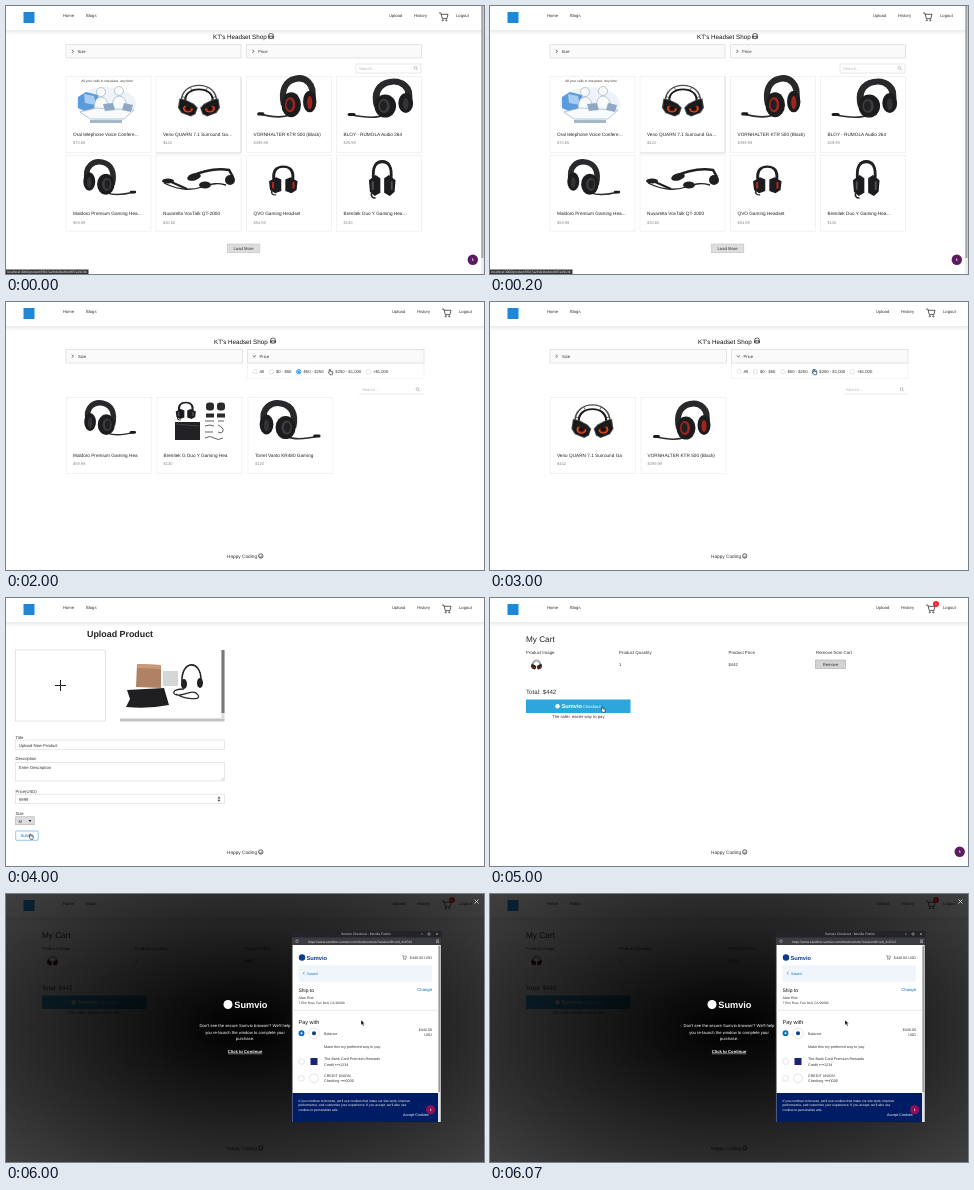
An HTML page that plays this animation: 478x268 px, repeating every 6990 ms.

```html
<!DOCTYPE html>
<html lang="en">
<head>
<meta charset="utf-8">
<title>Headset shop walkthrough</title>
<style>
html, body { margin: 0; width: 100%; height: 100%; overflow: hidden; background: #fff; }
svg { display: block; }
#stage { width: 100vw; height: 100vh; }
text { font: 4.2px "Liberation Sans", Arial, sans-serif; fill: #333; text-rendering: geometricPrecision; white-space: pre; }
.mid { text-anchor: middle; }
.end { text-anchor: end; }
.bold { font-weight: bold; }
.name { font-size: 4.7px; fill: #222; }
.soft { font-size: 4px; fill: #888; }
.hint { fill: #bbb; }
.label { font-size: 4.4px; }
.small { font-size: 3.7px; }
.tiny { font-size: 3.3px; }
.head { font-size: 8.2px; fill: #222; }
.shop { font-size: 6.25px; fill: #111; }
.link { fill: #0070ba; }
.white { fill: #fff; }
.line { fill: none; stroke: #d9d9d9; stroke-width: .7; }
.box { fill: #fafafa; stroke: #d9d9d9; stroke-width: .7; }
.field { fill: #fff; stroke: #d9d9d9; stroke-width: .6; }
.ink { fill: none; stroke: #222; stroke-width: .7; }

/* One second per scene; the opening scene is topmost, so it cuts the last one short. */
.scene { opacity: 0; animation: show 6990ms step-end calc(var(--at) * 1000ms - 6990ms) infinite; }
@keyframes show {
  0% { opacity: 1; }
  14.306%, 100% { opacity: 0; }
}
</style>
</head>
<body>
<svg id="stage" viewBox="0 0 478 268" preserveAspectRatio="none">
<defs>
  <linearGradient id="shade" x2="0" y2="1">
    <stop stop-color="#ebebeb"/><stop offset="1" stop-color="#fff"/>
  </linearGradient>
  <radialGradient id="dim" r=".707">
    <stop offset=".01"/><stop offset="1" stop-opacity=".75"/>
  </radialGradient>

  <g id="basket" fill="none" stroke="#333" stroke-width=".8">
    <path d="M0 1h1.8l1.5 5.6h4.6L9 2.3H2.2"/>
    <circle cx="3.8" cy="8.3" r=".6"/><circle cx="7.3" cy="8.3" r=".6"/>
  </g>
  <g id="menu">
    <text x="383" y="11">Upload</text>
    <text x="408" y="11">History</text>
    <use href="#basket" x="433" y="6"/>
    <text x="450" y="11">Logout</text>
  </g>
  <g id="page">
    <rect width="478" height="268" fill="#fff"/>
    <rect y="24" width="478" height="5" fill="url(#shade)"/>
    <rect x="17.5" y="6" width="11" height="11" fill="#1e88d8"/>
    <text x="57" y="11">Home</text>
    <text x="80" y="11">Blogs</text>
  </g>
  <g id="badge">
    <circle cx="443" cy="6" r="3" fill="#f5222d"/>
    <text class="mid white tiny" x="443" y="7.2">1</text>
  </g>
  <g id="scroll">
    <rect x="475" width="3" height="268" fill="#ececec"/>
    <rect x="475.3" width="2.2" height="252" fill="#a6a6a6"/>
  </g>
  <g id="avatar">
    <circle r="5.2" fill="#5c1a60"/>
    <text class="mid white" y="1.5">k</text>
  </g>
  <g id="footer">
    <text x="221" y="256" style="font-size:4.75px">Happy Coding</text>
    <circle class="ink" cx="254.8" cy="254" r="2.2"/>
    <path class="ink" d="M253.6 254.6q1.2 1.2 2.4 0M254 253.2h.2M255.5 253.2h.2"/>
  </g>
  <g id="shopIcon" class="ink">
    <path d="M-2.3 1V-1q0-1.6 1.6-1.6H.7q1.6 0 1.6 1.6V1M-2.3 0h4.6M-2.5 .2v2h1.2v-2M1.3 .2v2h1.2v-2M-1 2.4H1"/>
  </g>
  <g id="lens" class="ink" style="stroke:#aaa"><circle r="1.4"/><path d="M1 1l1.5 1.5"/></g>
  <path id="hand" d="M1 0v3.4L0 3.6l1.8 3h3L5.6 3 2.4 2.3V0z" fill="#fff" stroke="#111" stroke-width=".7"/>
  <rect id="card" width="85" height="76" fill="#fff" stroke="#efefef" stroke-width=".8"/>
  <circle id="radio" r="2.2" fill="#fff" stroke="#d4d4d4" stroke-width=".6"/>
  <g id="picked"><circle r="2.2" fill="#fff" stroke="#1890ff" stroke-width=".8"/><circle r="1.3" fill="#1890ff"/></g>

  <!-- headsets -->
  <g id="cup">
    <path d="M5 44L20 47 42 60 52 73 46 93 34 100 10 89 1 73z" fill="#47484c"/>
    <path d="M7 47L20 50 41 63 49 74 44 91 33 97 12 87 4 73z" fill="#17181a"/>
    <ellipse cx="27" cy="75" rx="13" ry="12.5" fill="#d84a20"/>
    <circle cx="27" cy="75" r="9" fill="#7a2410"/>
    <circle cx="27" cy="75" r="6" fill="#1d0c08"/>
    <path d="M8 61L43 77 44 68 15 53z" fill="#1b1c1e"/>
  </g>
  <g id="owl" fill="none">
    <path d="M10 52C10 22 29 2.5 55 2.5s45 19.500 45 49.500" stroke="#4c4d51" stroke-width="4"/>
    <path d="M20 50C19 30 33 15 55 15s36 15 35 35" stroke="#1a1b1d" stroke-width="5.500"/>
    <path d="M33 9l3 8M77 9l-3 8M12 38l10 4M98 38l-10 4" stroke="#333" stroke-width="2"/>
    <use href="#cup"/>
    <use href="#cup" transform="matrix(-1 0 0 1 110 0)"/>
  </g>
  <g id="side">
    <path d="M7 24C3 8 14 2 23 4 33 6 37 15 34 28" fill="none" stroke="#29292b" stroke-width="6"/>
    <path d="M28 37C36 41 48 39 58 36.500" fill="none" stroke="#2c2c2e" stroke-width="1.600"/>
    <ellipse cx="9" cy="25" rx="6.500" ry="10" fill="#1c1c1e"/>
    <ellipse cx="9" cy="26" rx="2.500" ry="6" fill="var(--tone, #333336)"/>
    <ellipse cx="27" cy="28" rx="9.500" ry="11.500" fill="#1c1c1e"/>
    <ellipse cx="28" cy="28" rx="5" ry="7" fill="var(--tone, #3c3c3f)"/>
    <ellipse cx="28.500" cy="28" rx="3" ry="5" fill="#202022"/>
    <rect x="53" y="35" width="7" height="3" rx="1.500" fill="#1c1c1e"/>
  </g>
  <g id="front">
    <path d="M6 20C4 6 9 2 15 2s11 4 9 18" fill="none" stroke="#202022" stroke-width="3"/>
    <path d="M1 20l7-5 5 3v14l-6 3-5-4zM29 20l-7-5-5 3v14l6 3 5-4z" fill="#1c1c1e"/>
    <path d="M5 21v8M25 21v8" stroke="var(--tone, #505055)" stroke-width="2"/>
    <path d="M4 31q-2 6 4 6" fill="none" stroke="#2a2a2c" stroke-width="1.600"/>
  </g>

  <g id="filterPage">
    <use href="#page"/><use href="#menu" x="3"/><use href="#footer"/>
    <text class="shop" x="208" y="41.5">KT's Headset Shop</text>
    <use href="#shopIcon" x="267" y="38.8"/>
    <rect class="box" x="60" y="47.5" width="176.5" height="13.5"/>
    <rect class="field" x="241.5" y="61" width="176.5" height="15.5" style="stroke:#eee"/>
    <rect class="box" x="241.5" y="47.5" width="176.5" height="13.5"/>
    <path class="ink" d="M66 52.7l1.4 1.5-1.4 1.5M246.8 53.5l1.5 1.4 1.5-1.4"/>
    <text x="72" y="56">Size</text>
    <text x="253.5" y="56">Price</text>
    <use href="#radio" x="249" y="69.7"/>
    <use href="#radio" x="265.5" y="69.7"/>
    <use href="#radio" x="292.7" y="69.7"/>
    <use href="#radio" x="324.5" y="69.7"/>
    <use href="#radio" x="362.3" y="69.7"/>
    <text x="253.5" y="71.2">All</text>
    <text x="270" y="71.2">$0 - $50</text>
    <text x="297.5" y="71.2">$50 - $250</text>
    <text x="329.3" y="71.2">$250 - $1,000</text>
    <text x="367" y="71.2">+$1,000</text>
    <path class="line" d="M353 92H418" style="stroke:#e6e6e6"/>
    <text class="hint" x="356" y="89">Search...</text>
    <use href="#lens" x="411.5" y="87"/>
  </g>

  <g id="cartPage">
    <use href="#page"/><use href="#menu" x="3"/><use href="#badge" x="3"/><use href="#footer"/>
    <text class="head" x="36" y="44">My Cart</text>
    <text class="label" x="36" y="56.3">Product Image</text>
    <text class="label" x="129" y="56.3">Product Quantity</text>
    <text class="label" x="238.5" y="56.3">Product Price</text>
    <text class="label" x="326" y="56.3">Remove from Cart</text>
    <use href="#owl" transform="translate(41 61.5) scale(.1)"/>
    <text x="129" y="68">1</text>
    <text x="238.5" y="68">$442</text>
    <rect x="325.5" y="62" width="30" height="8.5" fill="#d3d3d3" stroke="#aaa" stroke-width=".6"/>
    <text class="mid" x="340.5" y="67.8">Remove</text>
    <text x="36" y="95.7" style="font-size:6.2px">Total: $442</text>
    <rect x="36" y="101.5" width="104.5" height="13.5" fill="#2da6dc"/>
    <circle cx="67.5" cy="108.3" r="2.2" fill="#fff"/>
    <text class="bold white" x="71.5" y="110.3" style="font-size:5.7px">Sumvio</text>
    <text class="white" x="93" y="110">Checkout</text>
    <text class="mid" x="88.3" y="120.2">The safer, easier way to pay</text>
  </g>
</defs>

<!-- product page -->
<g class="scene" style="--at:1">
  <use href="#page"/><use href="#menu"/><use href="#badge"/>
  <text class="head mid" x="237.5" y="44">Veno QUARN 7.1 Surround Gaming Headset</text>
  <use href="#owl" x="72" y="89"/>
  <g fill="none" stroke="#868686" stroke-width="2.6">
    <path id="arrows" d="M36.500 129.500L26 139.500l10.500 10M218 129.500l10.500 10-10.500 10"/>
    <use href="#arrows" stroke="#fff" stroke-width="1.2"/>
    <g id="controls" stroke="#999" stroke-width="1.800">
      <path d="M27.300 204.800v8.400l6.200-4.200z"/>
      <path d="M219.500 207.500v-3h3M225.500 204.500h3v3M228.500 210.500v3h-3M222.500 213.500h-3v-3"/>
    </g>
    <path d="M27.300 204.800v8.400l6.200-4.200zM219.500 207.500v-3h3M225.500 204.500h3v3M228.500 210.500v3h-3M222.500 213.500h-3v-3" stroke="#fff" stroke-width=".6"/>
  </g>
  <rect x="82" y="222.2" width="28.800" height="21.200" fill="#fff" stroke="#337ab7" stroke-width="1.5"/>
  <use href="#owl" transform="translate(89.500 225.500) scale(.14)"/>
  <use href="#side" transform="matrix(-.48 0 0 .52 142 222)" style="--tone:#b3261e"/>
  <path d="M147 233l3-7 6-4 7 2 5 5-1 10-6 4-11-1z" fill="#29292c"/>
  <path d="M150 232l6-5 9 3M150 238l5-5 10 4" fill="none" stroke="#66666a"/>
  <text class="bold label" x="240" y="63">Product Info</text>
  <text x="240" y="75.7">Price : 442</text>
  <text x="312" y="75.7">Size : 0</text>
  <text x="384" y="75.7">Views : 6</text>
  <text x="240" y="87.2">Description :</text>
  <text x="265" y="87.2">The Veno QUARN 7.1 Surround Gaming headset includes the real plug-and-play USB game station.</text>
  <use href="#hand" transform="translate(365 84) scale(.75)"/>
  <rect x="329.5" y="106" width="37" height="12" rx="6" fill="#f8706c"/>
  <text class="mid white" x="348" y="113.5">Add to Cart</text>
  <use href="#footer" y="15.5"/>
  <use href="#scroll"/>
  <use href="#avatar" x="466.8" y="253.7"/>
</g>

<!-- price filter: middle range -->
<g class="scene" style="--at:2">
  <use href="#filterPage"/>
  <use href="#picked" x="292.7" y="69.7"/>
  <use href="#hand" transform="translate(322.5 67.5) scale(.8)"/>
  <use href="#card" x="60.3" y="95.5"/>
  <use href="#card" x="151" y="95.5"/>
  <use href="#card" x="242" y="95.5"/>
  <use href="#side" transform="translate(76 97.500) scale(.9)"/>
  <use href="#front" transform="translate(169 99.500) scale(.72 .5)"/>
  <rect x="169" y="120" width="25" height="18" fill="#222225"/>
  <path d="M170 122l23 2" stroke="#4a4a4e" stroke-width=".8"/>
  <g fill="#2a2a2d">
    <rect x="200" y="100.500" width="8" height="8" rx="3"/><rect x="211" y="100.500" width="8" height="8" rx="3"/>
    <rect x="200" y="111.500" width="8" height="4"/><rect x="211" y="111.500" width="8" height="4"/>
  </g>
  <path class="ink" d="M199 119h9M212 119h6M199 124q5-2 9 0M212 123q6 3 5 6t-5 1M199 130h8M199 136q5-3 9 0t9 0"/>
  <use href="#side" transform="translate(251 97.500) scale(1.06 1)"/>
  <text class="name" x="67" y="155">Maldoro Premium Gaming Hea</text>
  <text class="name" x="157.5" y="155">Brenitek G Duo Y Gaming Hea</text>
  <text class="name" x="249" y="155">Torrel Vanto KR480 Gaming</text>
  <text class="soft" x="67" y="163.3">$59.99</text>
  <text class="soft" x="157.5" y="163.3">$130</text>
  <text class="soft" x="249" y="163.3">$120</text>
</g>

<!-- price filter: next range -->
<g class="scene" style="--at:3">
  <use href="#filterPage"/>
  <use href="#picked" x="324.5" y="69.7"/>
  <use href="#hand" transform="translate(322.5 67.5) scale(.8)"/>
  <use href="#card" x="60.3" y="95.5"/>
  <use href="#card" x="151" y="95.5"/>
  <use href="#owl" transform="translate(81 102) scale(.39 .34)"/>
  <use href="#side" transform="matrix(-1 0 0 1 223 98)" style="--tone:#a3241d"/>
  <text class="name" x="67" y="155">Veno QUARN 7.1 Surround Ga</text>
  <text class="name" x="157.5" y="155">VORNHALTER KTR 500 (Black)</text>
  <text class="soft" x="67" y="163.3">$442</text>
  <text class="soft" x="157.5" y="163.3">$399.99</text>
</g>

<!-- upload form -->
<g class="scene" style="--at:4">
  <use href="#page"/><use href="#menu" x="3"/><use href="#footer"/>
  <text class="bold" x="81" y="39" style="font-size:8.9px;fill:#222">Upload Product</text>
  <rect class="line" x="9.5" y="52" width="90" height="71"/>
  <path class="ink" d="M49 87.5h11M54.5 82v11" style="stroke-width:1"/>
  <path d="M131 66l24 1v23l-25-1z" fill="#b08263"/>
  <path d="M131 66l24 1v4l-24-1z" fill="#c79a7a"/>
  <rect x="157" y="73" width="15" height="15" fill="#d5d6d8"/>
  <path d="M121 92l37-2 5 17q-20 4-43 2l4-8z" fill="#1f1f22"/>
  <path d="M176 84c-1-22 19-23 19-2" fill="none" stroke="#222" stroke-width="1.6"/>
  <ellipse cx="178" cy="86" rx="3" ry="5" fill="#222"/>
  <ellipse cx="194" cy="85" rx="3" ry="5" fill="#222"/>
  <path d="M178 91c-14 0-12 7-4 6s14-6 18 0-14 4-22-1" fill="none" stroke="#2a2a2a" stroke-width="1.3"/>
  <rect x="114" y="120.5" width="104.5" height="3" fill="#c2c2c2"/>
  <rect x="215.5" y="52" width="3" height="69" fill="#ddd"/>
  <rect x="215.5" y="52" width="3" height="63" fill="#777"/>
  <text x="9.5" y="140.5">Title</text>
  <rect class="field" x="9.5" y="142" width="209" height="9.5"/>
  <text x="13" y="148.5">Upload New Product</text>
  <text x="9.5" y="162.3">Description</text>
  <rect class="field" x="9.5" y="164.5" width="209" height="18.5"/>
  <text x="13" y="170.5">Enter Description</text>
  <path class="ink" d="M215 182.3l2.8-2.8M216.7 182.3l1-1" style="stroke:#888;stroke-width:.4"/>
  <text x="9.5" y="194.6">Price(USD)</text>
  <rect class="field" x="9.5" y="196.2" width="209" height="9.5"/>
  <text x="13" y="202.8">9999</text>
  <path d="M211.5 200.4l1.5-2 1.5 2zM211.5 201.8l1.5 2 1.5-2z" fill="#444"/>
  <text x="9.5" y="217">Size</text>
  <rect x="9.7" y="218.8" width="18.5" height="8" fill="#ddd" stroke="#aaa" stroke-width=".6"/>
  <text x="12.5" y="224.5">M</text>
  <path d="M22.5 222l1.5 2 1.5-2z" fill="#222"/>
  <rect x="9.7" y="233" width="22.5" height="9.3" rx=".8" fill="#fff" stroke="#69b1ee" stroke-width=".7"/>
  <text class="mid link" x="21" y="239.2">Submit</text>
  <use href="#hand" transform="translate(23 236) scale(.8)"/>
</g>

<!-- cart -->
<g class="scene" style="--at:5">
  <use href="#cartPage"/>
  <use href="#hand" transform="translate(111 109) scale(.8)"/>
  <use href="#avatar" x="469.7" y="253.7"/>
</g>

<!-- payment window over the cart -->
<g class="scene" style="--at:6">
  <use href="#cartPage"/>
  <rect width="478" height="268" fill="url(#dim)"/>
  <path d="M468.5 5.5l4 4M472.5 5.5l-4 4" stroke="#ddd" stroke-width=".8"/>
  <circle cx="222" cy="110.5" r="4.5" fill="#fff"/>
  <text class="bold white" x="228.3" y="114" style="font-size:9.2px">Sumvio</text>
  <g class="mid">
    <text class="white" x="239" y="133">Don't see the secure Sumvio browser? We'll help</text>
    <text class="white" x="239" y="139.7">you re-launch the window to complete your</text>
    <text class="white" x="239" y="146.3">purchase.</text>
    <text class="white bold" x="239" y="158.7" text-decoration="underline">Click to Continue</text>
  </g>

  <rect x="285.5" y="37" width="150" height="191.5" fill="#242428"/>
  <text class="mid tiny" x="360" y="41.4" style="fill:#ccc">Sumvio Checkout - Mozilla Firefox</text>
  <path d="M415 40h2M422 39h2v2h-2zM430 39l2 2M432 39l-2 2" stroke="#bbb" stroke-width=".5" fill="none"/>
  <rect x="286" y="43.5" width="149" height="7.5" fill="#3b3b42"/>
  <circle cx="291" cy="47.2" r="1.3" fill="none" stroke="#ccc" stroke-width=".5"/>
  <text class="tiny" x="302" y="48.5" style="fill:#ddd">https://www.sandbox.sumvio.com/checkoutnow?sessionID=uid_4c07e2</text>
  <rect x="426" y="44" width="8" height="6.5" fill="#3b3b42"/>
  <path d="M430 46h3M430 47.3h3M430 48.6h3" stroke="#ddd" stroke-width=".5"/>

  <rect x="286.5" y="51" width="148" height="177" fill="#fff"/>
  <circle cx="296" cy="63.5" r="3.2" fill="#0a3d91"/>
  <text class="bold" x="300.5" y="65.6" style="font-size:5.7px;fill:#0a3d91">Sumvio</text>
  <use href="#basket" transform="translate(396 61) scale(.5)"/>
  <text class="small end" x="426" y="65">$440.00 USD</text>
  <rect x="292.5" y="71.3" width="133.5" height="16.5" fill="#f0f5fc"/>
  <path d="M298.5 78l-1.3 1.3 1.3 1.3" fill="none" stroke="#0070ba" stroke-width=".6"/>
  <text class="small link" x="301" y="80.5">Saved</text>
  <text x="292.5" y="97.5" style="font-size:5px;fill:#111">Ship to</text>
  <text class="link end" x="426" y="97">Change</text>
  <text class="small" x="292.5" y="104.5">Alan Roe</text>
  <text class="tiny" x="292.5" y="110">7 Elm Row, Fair Dell, CA 90000</text>
  <path d="M286.5 116.3H432" stroke="#ddd" stroke-width=".7"/>
  <text x="292.5" y="130" style="font-size:5.5px;fill:#111">Pay with</text>
  <path d="M355 126v5l1.2-1 1 2 .9-.5-1-2h1.6z" fill="#111" stroke="#fff" stroke-width=".3"/>
  <circle cx="295.5" cy="139.2" r="2.9" fill="#0070ba"/>
  <circle cx="295.5" cy="139.2" r="1" fill="#fff"/>
  <circle cx="308" cy="139.2" r="5.3" fill="#fff" stroke="#ddd" stroke-width=".7"/>
  <circle cx="308" cy="139.2" r="2" fill="#0a3d91"/>
  <text class="small" x="318" y="140.7">Balance</text>
  <text class="small end" x="426" y="137.3">$440.00</text>
  <text class="small end" x="426" y="142.3">USD</text>
  <text class="small" x="318" y="153.8">Make this my preferred way to pay</text>
  <circle class="line" cx="295.5" cy="167.5" r="2.9"/>
  <rect x="304.5" y="164" width="7" height="7" fill="#1a2472"/>
  <text class="small" x="318" y="166.2">The Bank Card Premium Rewards</text>
  <text class="small" x="318" y="171.7">Credit ••••1234</text>
  <circle class="line" cx="295.5" cy="184.3" r="2.9"/>
  <circle class="line" cx="308" cy="184.3" r="4.5"/>
  <text class="small" x="318" y="182.6">CREDIT UNION</text>
  <text class="small" x="318" y="188.2">Checking ••••0000</text>

  <rect x="286.5" y="199" width="145.5" height="29" fill="#001c64"/>
  <text class="white tiny" x="292.5" y="207.7">If you continue to browse, we'll use cookies that make our site work, improve</text>
  <text class="white tiny" x="292.5" y="212.2">performance, and customize your experience. If you accept, we'll also use</text>
  <text class="white tiny" x="292.5" y="216.7">cookies to personalize ads.</text>
  <text class="white small" x="397" y="222.3">Accept Cookies</text>
  <rect x="432" y="51" width="2.5" height="177" fill="#e4e4e4"/>
  <rect x="432.5" y="52" width="1.5" height="146" fill="#9a9a9a"/>
  <circle cx="424.7" cy="215.7" r="4.7" fill="#8c1058"/>
  <text class="mid white small" x="424.7" y="217">k</text>
</g>

<!-- shop front -->
<g class="scene" style="--at:0">
  <use href="#page"/><use href="#menu"/>
  <text class="shop" x="207" y="32.7">KT's Headset Shop</text>
  <use href="#shopIcon" x="265" y="30.2"/>
  <rect class="box" x="60" y="38.7" width="175" height="13.3"/>
  <rect class="box" x="240.5" y="38.7" width="175" height="13.3"/>
  <path class="ink" d="M66 43.8l1.4 1.5-1.4 1.5M246.5 43.8l1.4 1.5-1.4 1.5"/>
  <text x="71.5" y="47">Size</text>
  <text x="252" y="47">Price</text>
  <rect class="field" x="350" y="58" width="65" height="9"/>
  <text class="hint" x="353" y="64">Search...</text>
  <use href="#lens" x="409.5" y="61.7"/>

  <g id="row">
    <use href="#card" x="60" y="70.5"/>
    <use href="#card" x="150" y="70.5"/>
    <use href="#card" x="240.5" y="70.5"/>
    <use href="#card" x="330.5" y="70.5"/>
  </g>
  <use href="#row" y="78.7"/>
  <path d="M150 147h85V71" fill="none" stroke="#dedede"/>

  <!-- call centre picture -->
  <ellipse cx="100" cy="98" rx="30" ry="17" fill="#edf3f9"/>
  <text class="tiny mid" x="101" y="75.500">All your calls in one place, any time</text>
  <path d="M72 91l8-5 12 3 3 12-12 6-11-5z" fill="#5b9bdd"/>
  <path d="M78 88l10 2 2 9-11-2z" fill="#a9cdf0"/>
  <g fill="#f8fafc" stroke="#a3b2c1" stroke-width=".7">
    <circle cx="95" cy="86" r="4.500"/><circle cx="113" cy="85" r="4.500"/>
    <path d="M88 104q0-13 7-13t8 13zM106 104q0-14 7-14t9 14z"/>
    <path d="M74 106l16-4 38 2-10 9H84z"/>
  </g>
  <path d="M97 98l10-1 2 7-10 1zM118 97l9 2-2 7-9-2z" fill="#8fa9c4"/>
  <path d="M84 114h32v3H84z" fill="#a4b8cc"/>

  <use href="#owl" transform="translate(171.5 78.5) scale(.39 .32)"/>
  <use href="#side" transform="matrix(-1.03 0 0 1.08 313 68.500)" style="--tone:#a3241d"/>
  <use href="#side" transform="matrix(-1.140 0 0 1 410 72)"/>
  <use href="#side" transform="translate(75 152.500) scale(.92)"/>
  <g fill="none" stroke="#202022">
    <path d="M158 177c12 6 26 8 38 4s16-4 24-2" stroke-width="1.3"/>
    <path d="M183 171q22-10 40-7l4 7" stroke-width="2.500"/>
    <path d="M163 175l18 8" stroke-width="2.200"/>
  </g>
  <g fill="#202022">
    <ellipse cx="188" cy="171" rx="7" ry="3.500" transform="rotate(-15 188 171)"/>
    <ellipse cx="199" cy="179" rx="6" ry="3.500"/>
    <ellipse cx="224" cy="174" rx="5" ry="5"/>
    <ellipse cx="162" cy="175" rx="6" ry="2.500"/>
  </g>
  <use href="#front" transform="translate(262 159) scale(1.02 .81)" style="--tone:#b3261e"/>
  <use href="#front" transform="translate(362 153.5) scale(.95 1.04)"/>

  <text class="name" x="67" y="129.7">Oral telephone Voice Confere…</text>
  <text class="name" x="157" y="129.7">Veno QUARN 7.1 Surround Ga…</text>
  <text class="name" x="247.5" y="129.7">VORNHALTER KTR 500 (Black)</text>
  <text class="name" x="337.5" y="129.7">BLOY - RUMOLA Audio 264</text>
  <text class="soft" x="67" y="138">$70.65</text>
  <text class="soft" x="157" y="138">$442</text>
  <text class="soft" x="247.5" y="138">$399.99</text>
  <text class="soft" x="337.5" y="138">$29.99</text>
  <text class="name" x="67" y="209.3">Maldoro Premium Gaming Hea…</text>
  <text class="name" x="157" y="209.3">Nuvarelta VoxTalk QT-2000</text>
  <text class="name" x="247.5" y="209.3">QVO Gaming Headset</text>
  <text class="name" x="337.5" y="209.3">Brenitek Duo Y Gaming Hea…</text>
  <text class="soft" x="67" y="217.5">$59.99</text>
  <text class="soft" x="157" y="217.5">$30.60</text>
  <text class="soft" x="247.5" y="217.5">$54.99</text>
  <text class="soft" x="337.5" y="217.5">$130</text>

  <rect x="221.3" y="238" width="32.5" height="8.7" fill="#ddd" stroke="#c4c4c4" stroke-width=".6"/>
  <text class="mid" x="237.5" y="244">Load More</text>
  <rect y="263.5" width="82.5" height="4.5" fill="#333336"/>
  <text class="tiny" x="1" y="267" style="fill:#eee">localhost:3000/product/5f0c7a29d13be84c06f7a2913b</text>
  <use href="#scroll"/>
  <use href="#avatar" x="466.8" y="253.7"/>
</g>
</svg>
</body>
</html>
```
